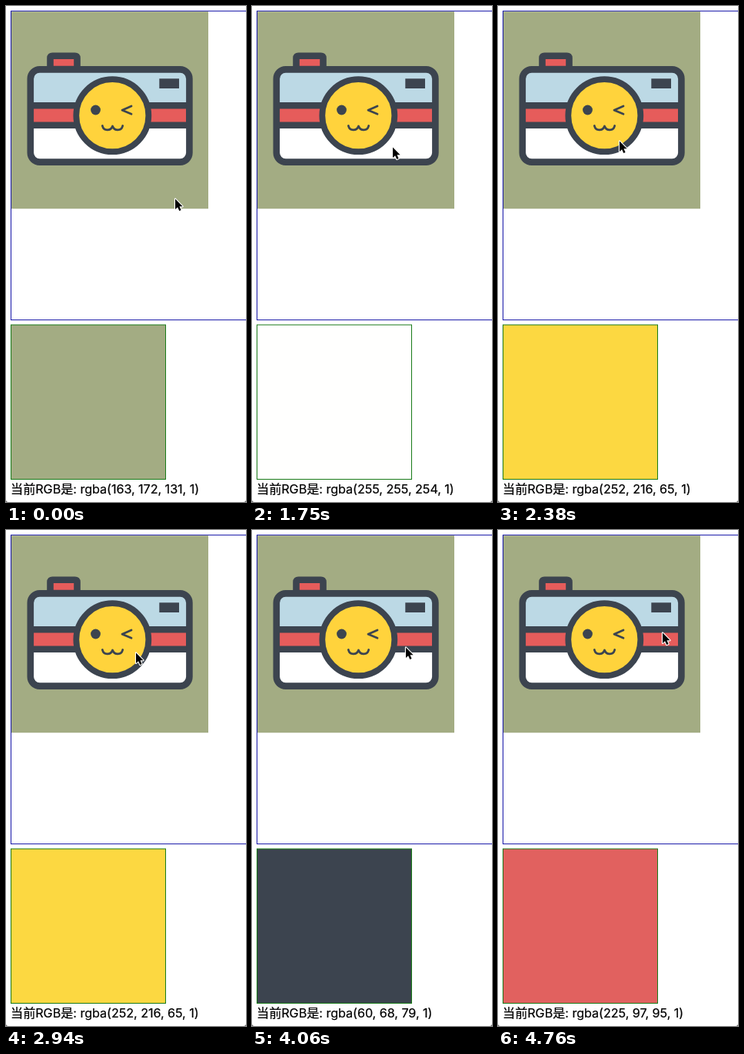
An HTML page that plays this animation: 312 px wide and 644 px high, repeating every 4.83 s.

```html
<!DOCTYPE html>
<html lang="zh">
<head>
<meta charset="utf-8">
<title>取色器</title>
<style>
  html, body { margin: 0; width: 100%; height: 100%; overflow: hidden; background: #fff; }
  svg { display: block; width: 312px; height: 644px; }
  text { font: 16.2px Inter, "Noto Sans CJK SC", "Noto Sans CJK", sans-serif; letter-spacing: -0.06px; white-space: pre; stroke: #000; stroke-width: .2; }
</style>
</head>
<body>
<svg viewBox="0 0 312 644">
  <rect width="312" height="644" fill="#fff"/>
  <path d="M0 641A3 3 0 0 0 3 644H0ZM312 641A3 3 0 0 1 309 644H312Z" fill="#555"/>

  <rect x="6.5" y="6.6" width="320" height="401" fill="none" stroke="#1414a8"/>
  <rect x="7" y="7.2" width="256" height="256" fill="#a3ac83"/>

  <path d="M57.5 82V67.5Q57.5 64.7 60.3 64.7H89.7Q92.5 64.7 92.5 67.5V82Z"
        fill="#e65c5b" stroke="#3c444f" stroke-width="8.6"/>
  <rect x="31.8" y="82.4" width="206.6" height="120.2" rx="12" fill="#fff"/>
  <rect x="34" y="85" width="202" height="41" fill="#bcd9e5"/>
  <rect x="34" y="125" width="202" height="34" fill="#3c444f"/>
  <rect x="36" y="133.5" width="198" height="17" fill="#e65c5b"/>
  <rect x="31.8" y="82.4" width="206.6" height="120.2" rx="12" fill="none" stroke="#3c444f" stroke-width="8.6"/>
  <rect x="199.3" y="94.3" width="25.7" height="12.7" fill="#3c444f"/>
  <circle cx="138.3" cy="142.2" r="47" fill="#ffd33c" stroke="#3c444f" stroke-width="7.8"/>
  <circle cx="116.5" cy="135" r="6.4" fill="#3c444f"/>
  <g fill="none" stroke="#3c444f" stroke-width="2.8" stroke-linecap="round" stroke-linejoin="round">
    <path d="M163 130L151 135.3L163 140.3"/>
    <path d="M125.3 155.5C127 162.7 136 162.7 138.5 156C141 162.7 150 162.7 151.7 155.5"/>
  </g>

  <rect id="swatch" x="6.5" y="414" width="201" height="200.5" stroke="#187a18"/>
  <text id="label" x="6" y="633"></text>

  <path id="cursor" d="M1 1.5V15L4.1 12.2L6.3 17L8.6 16L6.5 11.3H10.6Z"
        fill="#000" stroke="#fff" stroke-width="2.2" stroke-linejoin="round" paint-order="stroke"/>
</svg>
<script>
const LOOP = 4830, STEP = 70;

// time, x, y of the pointer tip
const path = [
  [0, 219, 249], [490, 207, 219], [770, 207, 219], [980, 201, 205],
  [1260, 190, 192], [1750, 182, 182], [2380, 157, 174], [2940, 168, 158],
  [3290, 177, 151], [4060, 199, 151], [4620, 211, 135], [4760, 213, 132]
];

// time from which a colour is picked
const picks = [
  [0, "163, 172, 131"], [840, "164, 172, 132"], [1050, "60, 68, 79"],
  [1190, "255, 255, 255"], [1400, "255, 255, 254"], [2030, "60, 68, 79"],
  [2240, "252, 216, 65"], [2590, "254, 215, 64"], [2870, "252, 216, 65"],
  [3220, "240, 217, 98"], [3430, "60, 68, 79"], [4200, "225, 97, 95"]
];

const [swatch, label, cursor] = ["swatch", "label", "cursor"].map(id => document.getElementById(id));

function pointAt(t) {
  let i = 1;
  while (i < path.length - 1 && t > path[i][0]) i++;
  const [t0, x0, y0] = path[i - 1], [t1, x1, y1] = path[i];
  const k = Math.min(1, (t - t0) / (t1 - t0));
  return [x0 + (x1 - x0) * k, y0 + (y1 - y0) * k];
}

function draw(ms) {
  const t = Math.floor((ms % LOOP) / STEP) * STEP;
  const rgb = picks.filter(p => p[0] <= t).pop()[1];
  swatch.setAttribute("fill", `rgb(${rgb})`);
  label.textContent = `当前RGB是: rgba(${rgb}, 1)`;
  cursor.setAttribute("transform", `translate(${pointAt(t).join(" ")})`);
}

let start;
function tick(now) {
  start ??= now;
  draw(Math.max(0, now - start));
  requestAnimationFrame(tick);
}
draw(0);
requestAnimationFrame(tick);
</script>
</body>
</html>
```
